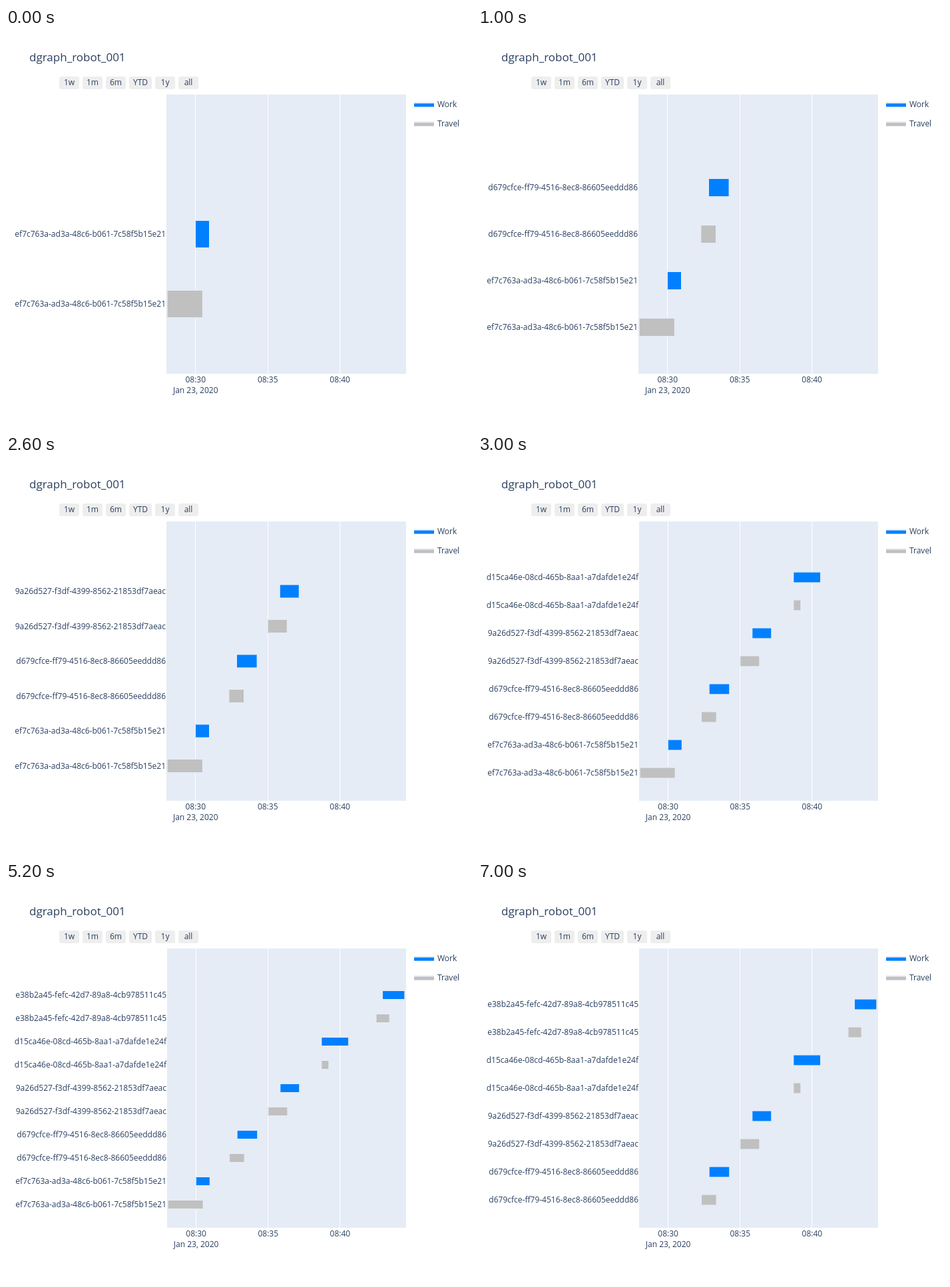
Recreate the animation shown at these times as an HTML page. Size 700 by 600 pixels, loop 8000 ms.

```html
<!DOCTYPE html>
<html lang="en">
<head>
<meta charset="utf-8">
<title>Robot schedule</title>
<style>
  html, body { margin: 0; width: 100%; height: 100%; overflow: hidden; background: #fff; }
  svg { display: block; }
  text { font: 12px "Open Sans", sans-serif; fill: #2a3f5f; white-space: pre; }
  .title { font-size: 17px; }
</style>
</head>
<body>
<svg id="stage" width="700" height="600" viewBox="0 0 700 600"></svg>
<script>
const NS = "http://www.w3.org/2000/svg";
const stage = document.getElementById("stage");
const PLOT = "#e5ecf6", BLUE = "#0080ff", GREY = "#c0c0c0";
const TOP = 100, BOTTOM = 520, RIGHT = 601, LEFT = 241;
const LOOP = 8000;

function add(parent, tag, attrs, text) {
  const el = document.createElementNS(NS, tag);
  for (const key in attrs) el.setAttribute(key, attrs[key]);
  if (text) el.textContent = text;
  parent.appendChild(el);
  return el;
}

function label(parent, x, y, text, anchor = "middle") {
  return add(parent, "text", { x, y, "text-anchor": anchor }, text);
}

// Each job: id, travel start and end, work start and end
const jobs = [
  ["ef7c763a-ad3a-48c6-b061-7c58f5b15e21", 242.7, 294.8, 285, 305],
  ["d679cfce-ff79-4516-8ec8-86605eeddd86", 335.3, 357, 347, 376.6],
  ["9a26d527-f3df-4399-8562-21853df7aeac", 393.8, 421.8, 411.8, 439.8],
  ["d15ca46e-08cd-465b-8aa1-a7dafde1e24f", 474, 484, 474, 513.8],
  ["e38b2a45-fefc-42d7-89a8-4cb978511c45", 556.4, 575.6, 565.9, 598.3]
];

const tasks = jobs.flatMap(([id, t0, t1, w0, w1]) => [
  { id, from: t0, to: t1, color: GREY },
  { id, from: w0, to: w1, color: BLUE }
]);

// Start time, first and last task shown, left edge of the plot
const steps = [
  { at: 0, first: 0, last: 2, left: 241 },
  { at: 1000, first: 0, last: 4, left: 241 },
  { at: 2000, first: 0, last: 6, left: 241 },
  { at: 3000, first: 0, last: 8, left: 242 },
  { at: 4000, first: 0, last: 10, left: 242 },
  { at: 6000, first: 1, last: 10, left: 242, clipFrom: 292.2 },
  { at: 7000, first: 2, last: 10, left: 242 }
];

function drawFixed() {
  add(stage, "text", { x: 35, y: 50, class: "title" }, "dgraph_robot_001");
  let x = 80;
  for (const name of ["1w", "1m", "6m", "YTD", "1y", "all"]) {
    const width = name === "YTD" ? 34 : 30;
    add(stage, "rect", { x, y: 73, width, height: 19, rx: 3, fill: "#eee" });
    label(stage, x + width / 2, 86, name);
    x += width + 5;
  }
  [["Work", BLUE], ["Travel", GREY]].forEach(([name, fill], i) => {
    const y = 114.5 + 29 * i;
    add(stage, "rect", { x: 613, y: y - 2, width: 30, height: 6, fill });
    add(stage, "rect", { x: 613, y: y - 3, width: 30, height: 2, fill: PLOT });
    label(stage, 648, y + 4.68, name, "start");
  });
}

function drawStep({ first, last, left, clipFrom = 0 }) {
  const group = add(stage, "g", { visibility: "hidden" });
  const toX = x => RIGHT - (RIGHT - x) * (RIGHT - left) / (RIGHT - LEFT);
  add(group, "rect", { x: left, y: TOP, width: RIGHT - left, height: BOTTOM - TOP, fill: PLOT });

  ["08:30", "08:35", "08:40"].forEach((time, i) => {
    const x = toX(284.75 + 108.45 * i);
    add(group, "path", {
      d: `M${x},${TOP}V${BOTTOM}`, stroke: "#fff", "shape-rendering": "crispEdges"
    });
    label(group, x, 533, time);
    if (!i) label(group, x, 548.6, "Jan 23, 2020");
  });

  const rows = tasks.slice(first, last);
  const unit = (BOTTOM - TOP) / (rows.length + 2);
  rows.forEach(({ id, from, to, color }, i) => {
    const y = BOTTOM - unit * (i + 1);
    const x = toX(Math.max(from, clipFrom));
    const height = unit * 0.4;
    add(group, "rect", {
      x: x - 1, y: y - height / 2, width: toX(to) - x + 2, height,
      fill: color, stroke: PLOT, "stroke-width": 2
    });
    label(group, left - 1, y + 4.2, id, "end");
  });
  return group;
}

drawFixed();
const groups = steps.map(drawStep);

function render(ms) {
  const current = steps.filter(step => step.at <= ms).length - 1;
  groups.forEach((group, i) =>
    group.setAttribute("visibility", i === current ? "visible" : "hidden"));
}

const start = performance.now();
function tick() {
  render((performance.now() - start) % LOOP);
  requestAnimationFrame(tick);
}
render(0);
requestAnimationFrame(tick);
</script>
</body>
</html>
```
